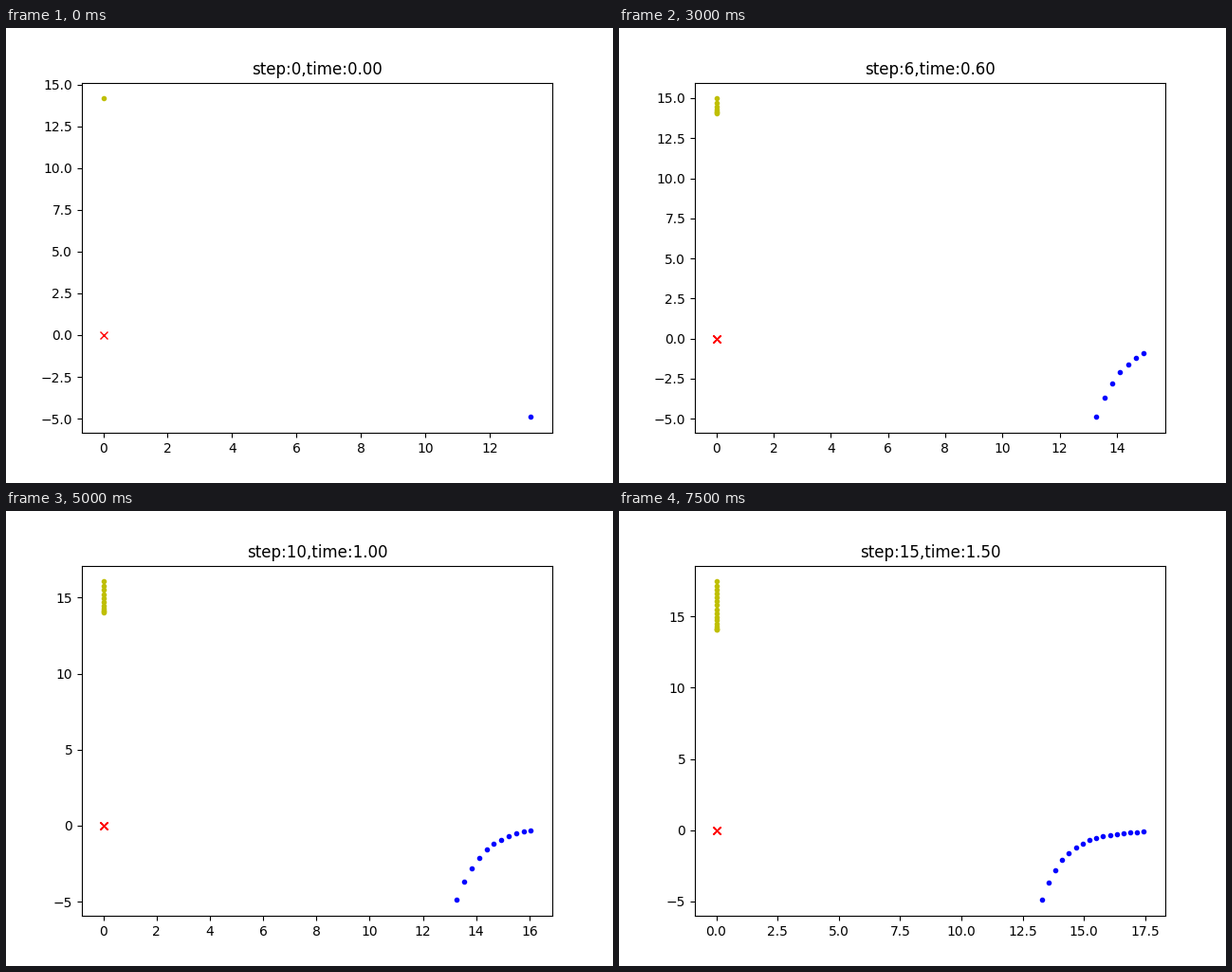
These frames come from a looping animation (640x480 px, 8 s). A matplotlib script:

```python
import matplotlib.pyplot as plt
import numpy as np
from matplotlib.animation import FuncAnimation

STEPS = 16
DT = 0.1

# The tracked point drifts right while its height decays towards the axis.
k = np.arange(STEPS)
x = 13.28 + 0.2778 * k
y = -0.04 - 4.86 * 0.752 ** k
dist = np.hypot(x, y)

fig, ax = plt.subplots(figsize=(6.4, 4.8), dpi=100)


def draw(step):
    n = step + 1
    zeros = np.zeros(n)
    ax.clear()
    ax.plot(x[:n], y[:n], "b.")
    ax.plot(zeros, dist[:n], "y.")
    ax.plot(zeros, zeros, "rx")
    ax.set_title(f"step:{step},time:{step * DT:.2f}")
    return ax.lines


anim = FuncAnimation(fig, draw, frames=STEPS, interval=500,
                     init_func=lambda: draw(0), repeat=True, repeat_delay=0)
plt.show()
```
